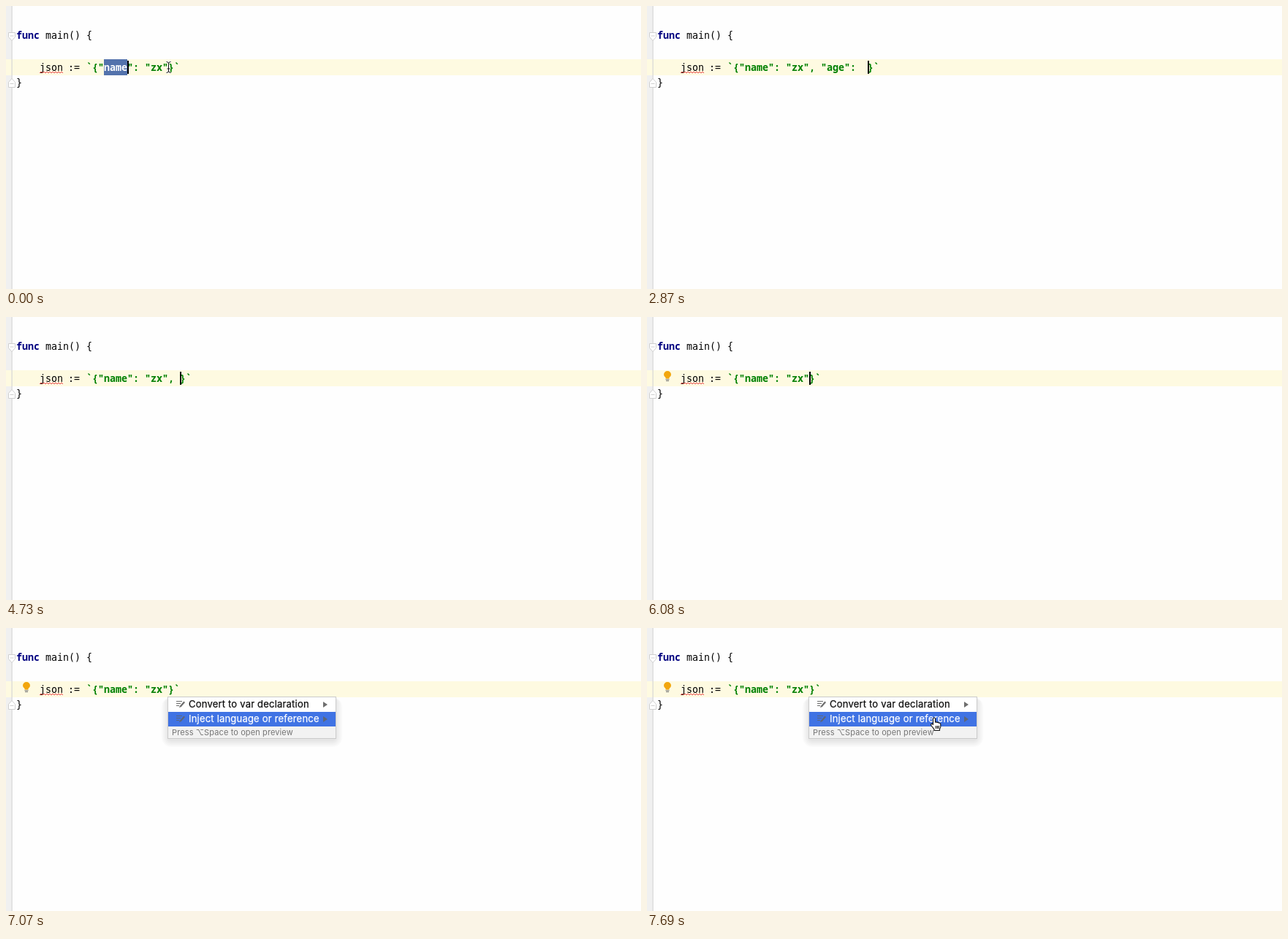
These frames come from a looping animation (869x388 px, 8000 ms). An HTML page:

```html
<!DOCTYPE html>
<html lang="en">
<head>
<meta charset="utf-8">
<title>Editor</title>
<style>
html, body { margin: 0; width: 100%; height: 100%; overflow: hidden; background: #fefefe; }
svg { display: block; }
text { white-space: pre; }
.code { font: 13.29px "DejaVu Sans Mono", monospace; }
.bold { font: 700 13.333px "Noto Sans Mono", "DejaVu Sans Mono", monospace; }
.str { fill: #008000; }
.ui { font: 13px Inter, "DejaVu Sans", sans-serif; letter-spacing: .2px; stroke-width: .25; }
.hint { font: 11px Inter, "DejaVu Sans", sans-serif; letter-spacing: .11px; fill: #757575; }
</style>
</head>
<body>
<svg width="869" height="388" viewBox="0 0 869 388">
  <defs>
    <g id="icon" fill="none" stroke-width="1.2">
      <path d="M0 1.5H8M0 4.5H6M0 7.5H4"/>
      <path d="M5.6 8.8L11.2 2.2" stroke-width="2.2"/>
      <path d="M4.6 10L5.6 7.8"/>
    </g>
    <path id="arrow" d="M434 -4L440 0L434 4Z"/>
    <path id="ibeam" d="M219.5 76.5Q222.5 76.5 222.5 79V89Q222.5 91.5 219.5 91.5M225.5 76.5Q222.5 76.5 222.5 79V89Q222.5 91.5 225.5 91.5M220.5 86H224.5"/>
  </defs>
  <rect width="869" height="388" fill="#fefefe"/>
  <rect width="8" height="388" fill="#f0f0f0"/>
  <rect y="73" width="869" height="22" fill="#fefae1"/>
  <rect x="7.5" width="1.2" height="388" fill="#d6d6d6"/>
  <g fill="#fff" stroke="#cfcfcf">
    <path d="M3.5 36.5H12.5V42.5L8 47.5L3.5 42.5Z M5.5 41H10.5"/>
    <path d="M3.5 111.5H12.5V104.5L8 99.5L3.5 104.5Z M5.5 106.5H10.5"/>
  </g>
  <g class="code">
    <text class="bold" x="14" y="45" fill="#000080">func</text>
    <text x="54" y="45">main() {</text>
    <text x="46" y="89">json</text>
    <text x="85" y="89">:</text>
    <text x="93" y="89">=</text>
    <text x="14" y="110">}</text>
    <text id="line" class="bold str" x="110" y="89"></text>
    <g id="selection">
      <rect x="134" y="73" width="32" height="22" fill="#5372ac"/>
      <text class="bold" x="134" y="89" fill="#fff">name</text>
    </g>
  </g>
  <path id="squiggle" fill="none" stroke="#e5352f" stroke-width=".9"/>
  <rect id="caret" y="75" width="2" height="18"/>
  <g id="beam" fill="none">
    <use href="#ibeam" stroke="#fff" stroke-width="2.4"/>
    <use href="#ibeam" stroke="#111"/>
  </g>
  <g id="bulb">
    <path d="M25.5 84.5V83Q23 81.5 23 79A5 5 0 0 1 33 79Q33 81.5 30.5 83V84.5Z" fill="#f2a60d"/>
    <path d="M25.5 85.7H30.5M26 87.5H30" stroke="#777"/>
  </g>
  <g id="menu">
    <g id="shadow"></g>
    <rect x="221.5" y="94.5" width="230" height="57" fill="#fff" stroke="#cacaca"/>
    <rect x="222" y="135" width="229" height="16" fill="#f2f2f2"/>
    <rect id="bar" x="222" width="229" height="20" fill="#4073e4"/>
    <g id="rows" class="ui"></g>
    <text class="hint" x="227" y="147">Press ⌥Space to open preview</text>
  </g>
  <path id="hand" fill="#fff" stroke="#111" stroke-width="1.1" stroke-linejoin="round"
    d="M-1.5 9.5V1.5Q-1.5 0 0 0T1.5 1.5V6.2Q2.7 5.3 4.2 6.6Q5.5 6 6.6 7.3Q8.8 7 8.8 9.2V12Q8.8 14 7.5 15.5V17.5H0V15.8L-3.8 11Q-5 9 -3.5 8.3Q-2.5 8.2 -1.5 9.5ZM2.5 11V15M4.5 11V15M6.3 11V15"/>
</svg>
<script>
const LOOP = 8000, CELL = 8;
const $ = id => document.getElementById(id);
const show = (id, on) => $(id).setAttribute('display', on ? 'inline' : 'none');

// [time, key]; '<' is backspace
const keys = [
  [710, ','], [1160, ' '], [1610, '"'], [1880, 'a'], [1970, 'g'], [2060, 'e'],
  [2510, '"'], [2690, ':'], [2870, ' '], [3230, '1'],
  ...[3580, 3670, 3850, 3940, 4120, 4300, 4470, 4560, 4730, 4910, 5270].map(t => [t, '<'])
];

// Pointer stops: [time, x, y]
const stops = [
  [7340, 270, 100], [7430, 314, 102], [7520, 350, 107], [7610, 378, 116], [7690, 393, 123]
];

const labels = ['Convert to var declaration', 'Inject language or reference'];
$('rows').innerHTML = labels.map((label, i) => {
  const y = 105 + 20 * i;
  return `<g><use href="#icon" x="233" y="${y - 6}"/>` +
    `<text x="250" y="${y + 4}">${label}</text><use href="#arrow" y="${y}"/></g>`;
}).join('');

// Soft shadow from nested translucent rings
let rings = '';
for (let e = 9; e > 0; e -= 2) {
  rings += `<rect x="${222 - e}" y="95" width="${229 + 2 * e}" height="${59 + e}" rx="${e + 4}" opacity=".02"/>`;
}
$('shadow').innerHTML = rings;

let wave = 'M46 92';
for (let x = 48, i = 0; x <= 78; x += 2, i++) wave += `L${x} ${i % 2 ? 92 : 90}`;
$('squiggle').setAttribute('d', wave);

function typed(t) {
  let left = '', right = '';
  for (const [at, key] of keys) {
    if (at > t) break;
    if (key === '<') left = left.slice(0, -1);
    else if (key === '"' && right) { left += key; right = ''; }
    else {
      left += key === ':' ? ': ' : key;
      if (key === '"') right = '"';
    }
  }
  return [left, right];
}

function draw(t) {
  const [left, right] = typed(t);
  $('line').textContent = '`{"name": "zx"' + left + right + '}`';
  $('caret').setAttribute('x', t < 260 ? 166 : 222 + CELL * left.length);
  show('caret', t < 6260);
  show('selection', t < 260);
  show('beam', t < 710);
  show('bulb', (t >= 90 && t < 260) || t >= 6080);
  show('menu', t >= 6260);

  const stop = stops.filter(s => s[0] <= t).pop();
  show('hand', stop);
  if (stop) $('hand').setAttribute('transform', `translate(${stop[1]} ${stop[2]})`);

  const row = t < 7070 || (stop && stop[2] < 115) ? 0 : 1;
  $('bar').setAttribute('y', 95 + 20 * row);
  [...$('rows').children].forEach((g, i) => {
    const [icon, label, arrow] = g.children;
    const ink = i === row ? '#fff' : '#111', gray = i === row ? '#5d6678' : '#6e6e6e';
    icon.setAttribute('stroke', gray);
    label.setAttribute('fill', ink);
    label.setAttribute('stroke', ink);
    arrow.setAttribute('fill', gray);
  });
}

const start = performance.now();
function tick() {
  draw((performance.now() - start) % LOOP);
  requestAnimationFrame(tick);
}
draw(0);
requestAnimationFrame(tick);
</script>
</body>
</html>
```
